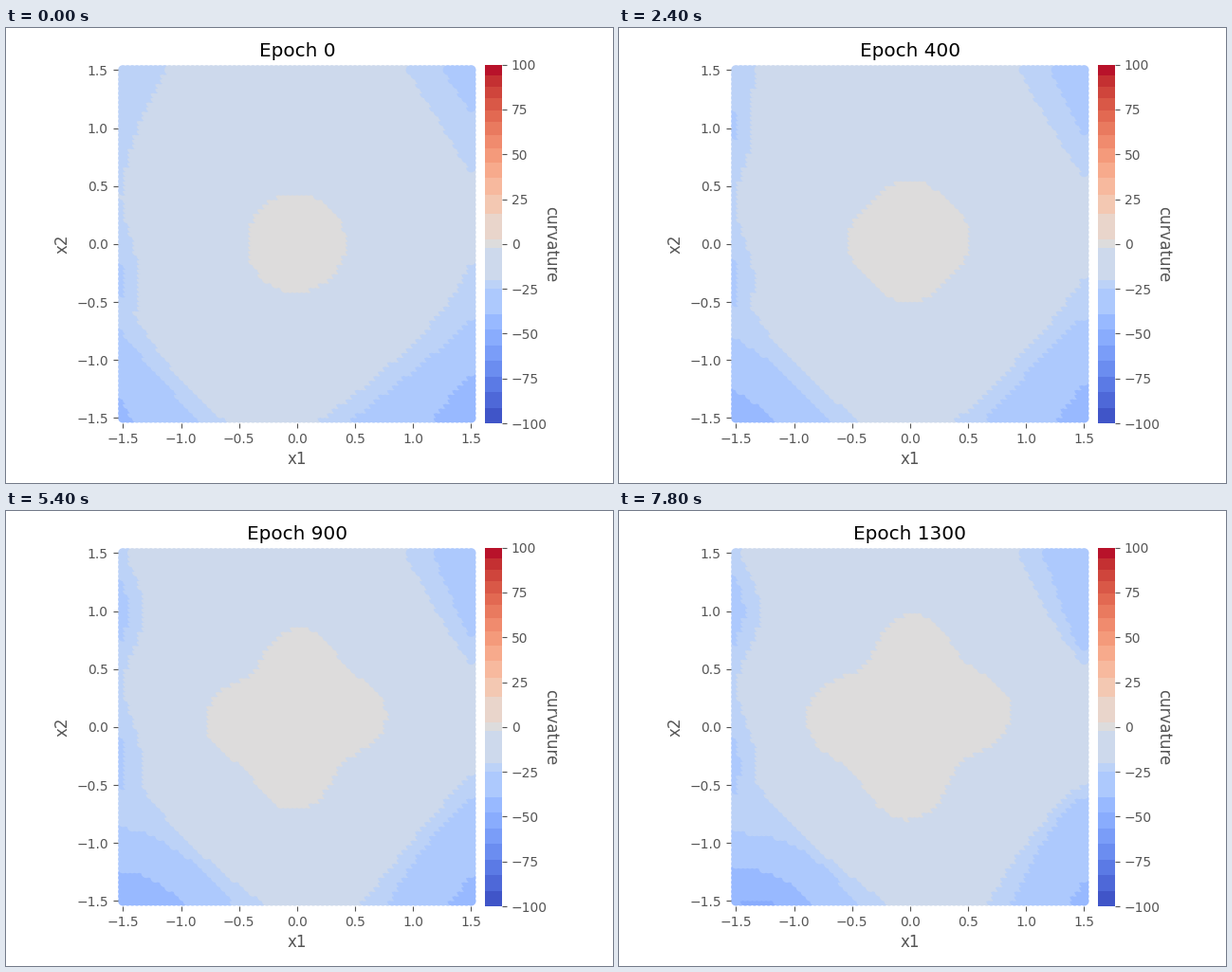
Animation, 640 px wide and 480 px high, one loop 8000 ms. Source, as a matplotlib script:

```python
import matplotlib.pyplot as plt
import numpy as np
from matplotlib.animation import FuncAnimation

W, H = 640, 480
GREY = "#555555"
TOP, BOTTOM = 38.6, 417.1
LIMIT = 1.547         # half width of the plotted square
LAST_EPOCH = 1300

# Regions growing out of the corners: level, side of x, side of y, then
# (height where it starts, depth at the corner, power of the curve) first and last
CORNERS = [
    (2, -1, 1, (.40, .41, 1.5), (.40, 0, 1.5)),
    (2, -1, -1, (0, .88, 2), (0, 1.31, 1.6)),
    (2, 1, 1, (.48, .61, 1.05), (.48, .63, .77)),
    (2, 1, -1, (-.10, 1.33, 1.7), (.48, .87, .7)),
    (3, -1, -1, (.72, .67, 1.1), (.92, 1.05, .4)),
    (3, 1, 1, (.95, .31, 1.4), (.55, .41, .75)),
    (3, 1, -1, (.60, 1.06, 1.1), (.58, .67, .63)),
    (4, -1, -1, (1.30, .10, 1), (1.23, .66, .35)),
    (4, 1, -1, (1.08, .37, .85), (1.25, .17, 1)),
]

# Colour bar steps from +100 down to -100
reds = 100 * (np.arange(12, 0, -1) / 12) ** .72
blues = -np.concatenate([[2, 20, 25], np.linspace(39, 100, 8)])
STEPS = np.concatenate([reds, [2.6], blues])
BAND_COLORS = plt.cm.coolwarm((STEPS[:-1] + STEPS[1:]) / 400 + .5)
LEVEL_COLORS = BAND_COLORS[12:18]

DOT_X, DOT_Y = (g.ravel() for g in np.meshgrid(*[np.linspace(-1.5, 1.5, 76)] * 2))
# Later dots overlap earlier ones, so the visible part sits left of and below the middle
X, Y = DOT_X - .0225, DOT_Y - .0225


def mix(a, b, t):
    return a + (b - a) * t


def in_core(s):
    """Central region: a lopsided disc that turns into a four-pointed star."""
    dx, dy = X - mix(-.03, 0, s), Y - mix(.02, .1, s)
    a = np.arctan2(dy, dx)
    disc = .425 + .02 * np.cos(a + np.pi / 4)
    star = (.76 + .124 * np.cos(4 * a) + .045 * np.sin(2 * a)
            - .025 * np.cos(a - np.pi / 4))
    return np.hypot(dx, dy) < mix(disc, star, s)


def corner_reach(side, first, last, t):
    start, depth, power = (mix(a, b, t) for a, b in zip(first, last))
    return depth * np.clip((side * Y - start) / (1.5 - start), 0, None) ** power


def left_bulge(t):
    upper = mix(.12, .25, t) * np.exp(-((Y - 1) / .45) ** 2)
    lower = mix(.18, .21, t) * np.exp(-((Y + .33) / .5) ** 2)
    return np.maximum(upper, lower)


def levels(epoch):
    t = epoch / LAST_EPOCH
    drift = t ** .7
    level = np.ones(len(X), int)
    level[in_core(t * t * (3 - 2 * t))] = 0

    bulge = left_bulge(drift)
    level[X + LIMIT < bulge] = 2
    level[X + LIMIT < bulge - .14] = 3
    for n, side_x, side_y, first, last in CORNERS:
        inside = LIMIT - side_x * X < corner_reach(side_y, first, last, drift)
        level[inside] = np.maximum(level[inside], n)

    spot = .17 * np.clip((epoch - 900) / 250, 0, 1)
    level[np.hypot(X + 1.32, 3 * (Y + 1.55)) < spot] = 5
    return level


def add_axes(left, right):
    ax = fig.add_axes([left / W, 1 - BOTTOM / H, (right - left) / W, (BOTTOM - TOP) / H])
    ax.spines[:].set_visible(False)
    ax.tick_params(color=GREY, labelcolor=GREY)
    return ax


plt.rcParams["font.family"] = "DejaVu Sans"
fig = plt.figure(figsize=(W / 100, H / 100), dpi=100, facecolor="white")

ax = add_axes(117.6, 496.1)
ticks = np.arange(-1.5, 1.6, .5)
ax.set(xlim=(-LIMIT, LIMIT), ylim=(-LIMIT, LIMIT), xticks=ticks, yticks=ticks)
ax.set_xlabel("x1", size=12, color=GREY)
ax.set_ylabel("x2", size=12, color=GREY)
title = ax.set_title("", size=14.4, color="black")
dots = ax.scatter(DOT_X, DOT_Y, s=36, linewidths=1.5)

bar = add_axes(505, 523)
bar.bar(0, -np.diff(STEPS), 1, bottom=STEPS[1:], color=BAND_COLORS, antialiased=False)
bar.set(xlim=(-.5, .5), ylim=(-100, 100), xticks=[], yticks=range(-100, 101, 25))
bar.yaxis.tick_right()
fig.text(574 / W, 1 - (TOP + BOTTOM) / 2 / H, "curvature", size=12, color=GREY,
         rotation=270, ha="center", va="center")


def update(frame):
    epoch = 50 * (frame // 3)
    colors = LEVEL_COLORS[levels(epoch)]
    dots.set_facecolor(colors)
    dots.set_edgecolor(colors)
    title.set_text(f"Epoch {epoch}")
    return dots, title


anim = FuncAnimation(fig, update, frames=80, interval=100, repeat=True, repeat_delay=0)
plt.show()
```
